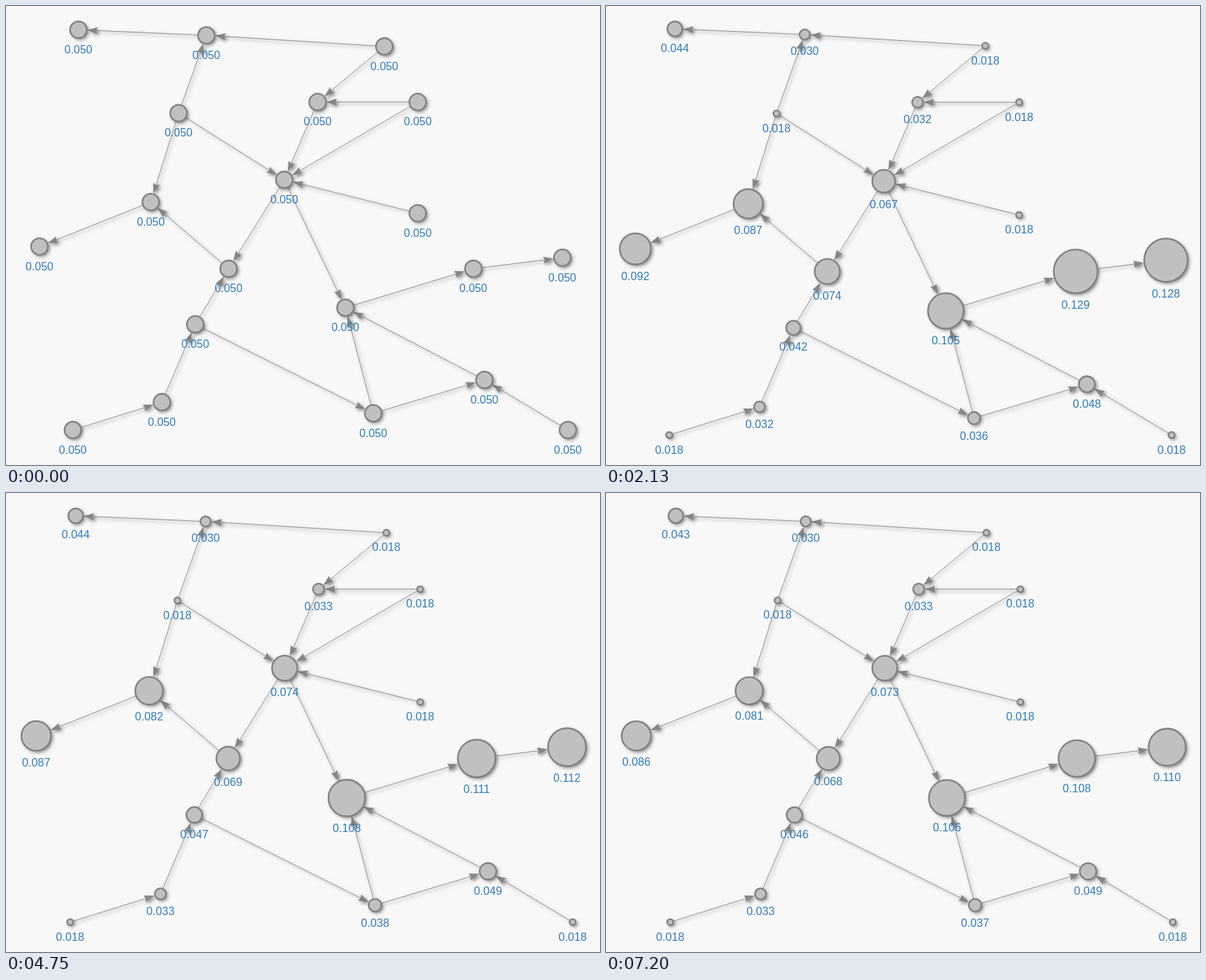
These frames come from a looping animation (851 by 658 pixels, 8 s). An HTML page:

```html
<!DOCTYPE html>
<html lang="en">
<head>
<meta charset="utf-8">
<title>PageRank iteration</title>
<style>
  html, body { margin: 0; width: 100%; height: 100%; overflow: hidden; background: #f8f8f8; }
  svg { display: block; }
  #edges line { stroke: #848484; stroke-width: .9; }
  #edges path { fill: #848484; }
  #discs circle { fill: #c0c0c0; }
  #rings circle { fill: none; stroke: #808080; stroke-width: 2.3; }
  #labels text { fill: #337ab7; font-family: "Liberation Sans", Arial, sans-serif; text-anchor: middle; }
</style>
</head>
<body>
<svg width="851" height="658" viewBox="0 0 851 658">
  <defs>
    <filter id="shadow" filterUnits="userSpaceOnUse" x="0" y="0" width="851" height="658" color-interpolation-filters="sRGB">
      <feDropShadow dx="2.5" dy="2.5" stdDeviation="2.5" flood-color="#000" flood-opacity=".5"/>
    </filter>
  </defs>
  <g id="edges" filter="url(#shadow)"></g>
  <g id="discs" filter="url(#shadow)"></g>
  <g id="rings"></g>
  <g id="labels"></g>
</svg>
<script>
const LOOP = 8000;
const STEPS = [0, 500, 1330, 2130, 2940, 3940, 4750, 5590, 6400, 7200];
const DAMPING = 0.85, UNIT = 10, SIZE = 300, LABEL = 20.4, FONT = 20;
const VIEW = { top: 22.1, height: 613.9, midX: 426.5 };

// Grid positions, listed in the order the ranks are updated.
const nodes = {
  G: [50, 27], L: [84, 43], N: [61, 50], K: [40, 43], O: [34, 53],
  P: [28, 67], Q: [12, 72], R: [66, 69], S: [86, 63], T: [101, 72],
  D: [56, 13], F: [31, 15], I: [74, 33], E: [74, 13], H: [26, 31],
  J: [6, 39], B: [36, 1], A: [13, 0], C: [68, 3], M: [100, 41]
};
const edges = ("BA CB CD ED EG FB FG FH DG IG HJ GK GN KH " +
  "OK OR PO QP RN RS SN TS NL LM").split(" ");
const ids = Object.keys(nodes);

const outs = id => edges.filter(e => e[0] === id).length;
const degree = Object.fromEntries(ids.map(id => [id, outs(id)]));

// One in-place PageRank sweep; sinks share their rank with every node.
function sweep(prev) {
  const rank = { ...prev };
  const sinks = ids.filter(id => !degree[id]).reduce((sum, id) => sum + rank[id], 0);
  const base = (1 - DAMPING + DAMPING * sinks) / ids.length;
  for (const id of ids) {
    const inflow = edges.filter(e => e[1] === id)
      .reduce((sum, e) => sum + rank[e[0]] / degree[e[0]], 0);
    rank[id] = base + DAMPING * inflow;
  }
  return rank;
}

const states = [Object.fromEntries(ids.map(id => [id, 1 / ids.length]))];
while (states.length < STEPS.length) states.push(sweep(states.at(-1)));

// Fit the view around discs and the lowest labels.
function layout(rank) {
  const items = ids.map(id => ({
    id, x: nodes[id][0] * UNIT, y: nodes[id][1] * UNIT, r: rank[id] * SIZE
  }));
  const min = f => Math.min(...items.map(f));
  const max = f => Math.max(...items.map(f));
  const top = min(n => n.y - n.r);
  const bottom = max(n => n.y + n.r + LABEL);
  const midX = (min(n => n.x - n.r) + max(n => n.x + n.r)) / 2;
  const scale = VIEW.height / (bottom - top);
  const placed = {};
  for (const n of items) {
    placed[n.id] = {
      x: VIEW.midX + (n.x - midX) * scale,
      y: VIEW.top + (n.y - top) * scale,
      r: n.r * scale,
      text: rank[n.id].toFixed(3)
    };
  }
  return { placed, scale };
}

const px = v => v.toFixed(2);

function arrow(a, b, scale) {
  const angle = Math.atan2(b.y - a.y, b.x - a.x);
  const c = Math.cos(angle), s = Math.sin(angle);
  const len = 18 * scale, gap = b.r + 0.9;
  const at = (back, side) => [b.x - (gap + back) * c - side * s, b.y - (gap + back) * s + side * c].map(px);
  const [x2, y2] = at(len * 0.9, 0);
  const head = [at(0, 0), at(len, len / 3), at(len * 0.9, 0), at(len, -len / 3)];
  return `<line x1="${px(a.x)}" y1="${px(a.y)}" x2="${x2}" y2="${y2}"/><path d="M${head.join("L")}Z"/>`;
}

const fill = (id, parts) => { document.getElementById(id).innerHTML = parts.join(""); };

function draw(rank) {
  const { placed, scale } = layout(rank);
  const list = Object.values(placed);
  const discs = list.map(n => `<circle cx="${px(n.x)}" cy="${px(n.y)}" r="${px(n.r)}"/>`);
  const size = FONT * scale;
  fill("edges", edges.map(e => arrow(placed[e[0]], placed[e[1]], scale)));
  fill("discs", discs);
  fill("rings", discs);
  fill("labels", list.map(n =>
    `<text x="${px(n.x)}" y="${px(n.y + n.r + LABEL * scale + size * 0.35)}" font-size="${px(size)}">${n.text}</text>`));
}

let shown = -1;
const start = performance.now();
function tick() {
  const t = (performance.now() - start) % LOOP;
  const step = STEPS.findLastIndex(at => at <= t);
  if (step !== shown) draw(states[shown = step]);
  requestAnimationFrame(tick);
}
tick();
</script>
</body>
</html>
```
